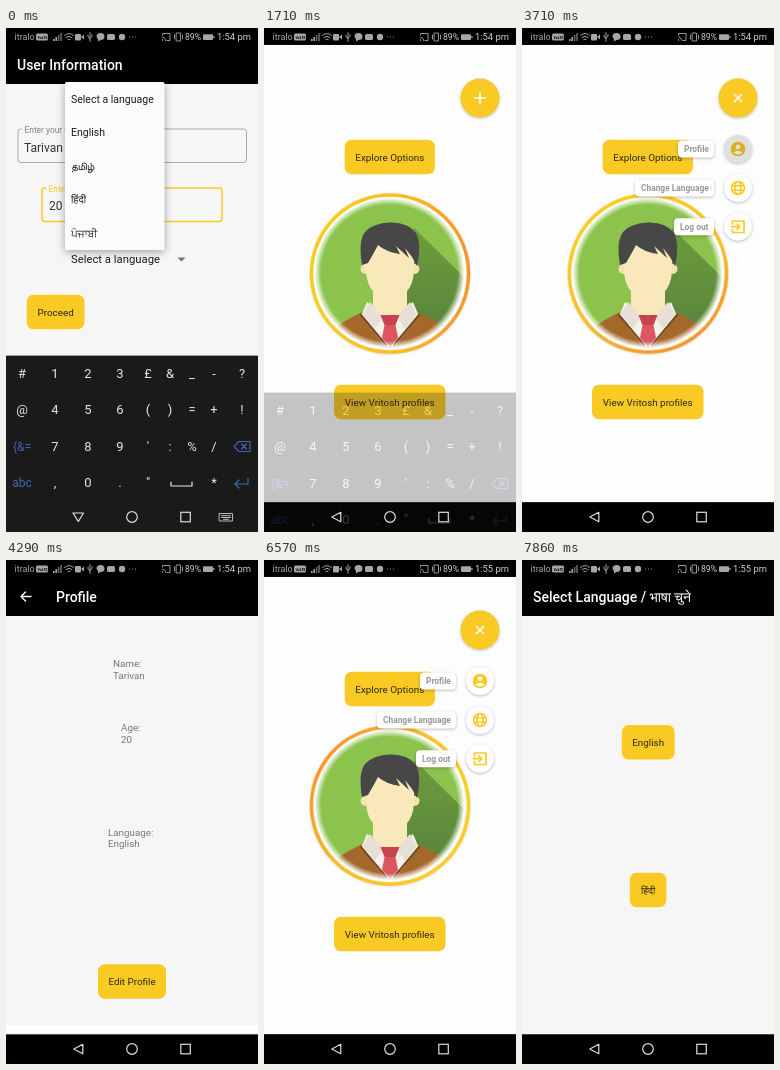
An HTML page for the animation above (8000 ms loop, 252 px wide and 504 px high).

```html
<!DOCTYPE html>
<html lang="en">
<head>
<meta charset="utf-8">
<title>App walkthrough</title>
<style>
html, body { margin: 0; width: 100%; height: 100%; overflow: hidden; background: #000; }
svg { display: block; width: 100vw; height: 100vh; font-family: Roboto, "Noto Sans", sans-serif; }
text { white-space: pre; }
.title { font-size: 14px; font-weight: 500; fill: #fff; }
.btn { font-size: 9.85px; fill: #2b2717; text-anchor: middle; }
.item { font-size: 10.5px; fill: #1c1c1c; }
.indic { font-weight: 500; }
.field { font-size: 12px; fill: #333; }
.hint { font-size: 8.4px; }
.info { font-size: 9.8px; fill: #777; }
.chip { font-size: 8.4px; font-weight: 700; fill: #989898; }
.status { font-size: 9px; fill: #a6a6a6; }
.bright { fill: #cfcfcf; }
.key { font-size: 13px; fill: #e6e6e6; text-anchor: middle; }
.fn { fill: #4166b0; }
.line { fill: none; stroke-linecap: round; stroke-linejoin: round; }
.lift { filter: drop-shadow(0 1px 1.5px rgba(0,0,0,.25)); }
.float { filter: drop-shadow(0 2px 4px rgba(0,0,0,.35)); }
#ring { transform-origin: 126px 245.5px; }
#plus { transform-origin: 216px 70px; }
</style>
</head>
<body>
<svg id="stage" viewBox="0 0 252 504" preserveAspectRatio="none"></svg>
<script>
const FRAMES = 56, LOOP = 8000;
const YELLOW = '#f9c924', DIM = '#a6a6a6';
const STATUS_BOTTOM = 16.8, NAV_TOP = 474.4;

const rect = (x, y, w, h, fill, rx = 0, more = '') =>
  `<rect x="${x}" y="${y}" width="${w}" height="${h}" rx="${rx}" fill="${fill}" ${more}/>`;
const circle = (x, y, r, fill, more = '') => `<circle cx="${x}" cy="${y}" r="${r}" fill="${fill}" ${more}/>`;
const path = (d, fill, more = '') => `<path d="${d}" fill="${fill}" ${more}/>`;
const line = (d, stroke, width = 1) => `<path class="line" d="${d}" stroke="${stroke}" stroke-width="${width}"/>`;
const text = (x, y, kind, label, more = '') => `<text x="${x}" y="${y}" class="${kind}" ${more}>${label}</text>`;
const group = (id, body, more = '') => `<g id="${id}" ${more}>${body}</g>`;
const button = (x, y, w, label) =>
  rect(x, y, w, 34.5, YELLOW, 7) + text(x + w / 2, y + 20.9, 'btn', label);
const page = (title, x) =>
  rect(0, 56, 252, NAV_TOP - 56, '#f6f6f6') + rect(0, 0, 252, 56, '#000') + text(x, 41.5, 'title', title);

const defs = `<defs>
  <linearGradient id="sweep" gradientUnits="userSpaceOnUse" x1="46" y1="0" x2="206" y2="0">
    <stop offset=".1" stop-color="#fbcb24"/><stop offset=".55" stop-color="#f9bd25"/><stop offset="1" stop-color="#f7952a"/>
  </linearGradient>
  <linearGradient id="shade" x1="0" y1="0" x2="0" y2="1">
    <stop offset="0" stop-color="#6d9c3d"/><stop offset="1" stop-color="#56803a"/>
  </linearGradient>
  <radialGradient id="soft" gradientUnits="userSpaceOnUse" cx="125.5" cy="245" r="75">
    <stop offset=".91" stop-color="#fff"/><stop offset="1" stop-color="#000"/>
  </radialGradient>
  <mask id="round">${circle(125.5, 245, 75, 'url(#soft)')}</mask>
</defs>`;

const form = () => page('User Information', 11) +
  rect(12, 101, 228.5, 33.5, 'none', 3, 'stroke="#a0a0a0" stroke-width=".9"') +
  rect(16, 98, 68, 6, '#f6f6f6') + text(18.5, 104.5, 'hint', 'Enter your name', 'fill="#808080"') +
  text(18, 123.5, 'field', 'Tarivan') +
  rect(36, 160, 180, 33.5, 'none', 3, `stroke="${YELLOW}" stroke-width="1.5"`) +
  rect(40, 157, 62, 6, '#f6f6f6') + text(42.5, 163.5, 'hint', 'Enter your age', `fill="${YELLOW}"`) +
  text(43, 182, 'field', '20') +
  group('unset', text(65, 235, 'item', 'Select a language', 'style="font-size:11.3px"')) +
  group('chosen', text(65, 235, 'item', 'English', 'style="font-size:11.3px"')) +
  path('M171.5 229.5h8l-4 4z', '#757575') +
  button(20.7, 266.8, 57.8, 'Proceed') +
  group('pressProceed', rect(20.7, 266.8, 57.8, 34.5, '#000', 7));

const dropdown = () => rect(59, 54, 99.5, 168, '#fbfbfb', 1.5, 'class="float"') +
  group('pressEnglish', rect(59, 88, 99.5, 33, '#000')) +
  ['Select a language', 'English', 'தமிழ்', 'हिंदी', 'ਪੰਜਾਬੀ']
    .map((label, i) => text(65, 75 + i * 33.4, i > 1 ? 'item indic' : 'item', label)).join('');

const avatar = () => `<g mask="url(#round)">` +
  rect(50, 168, 152, 154, '#8bc34d') +
  path('M150 200L202 251V322H140L112 290z', 'url(#shade)') +
  path('M62 322L72 300Q80 292 103 282L126 296 149 282Q172 292 180 300L190 322z', '#a5682b') +
  path('M103 274L126 292 149 274 155 288 131 318H121L97 288z', '#f5f1ea') +
  line('M97 287L122 317M155 287L130 317', '#75481f', 2) +
  circle(101.5, 241, 5, '#f7e2b0') + circle(150.5, 241, 5, '#f7e2b0') +
  path('M102 212H150V243Q149 257 143 263V279Q138 288 126 288T109 279V263Q103 257 102 243z', '#f9e8ba') +
  path('M98 237Q94 213 101 204 109 195 126 194.500 144 194 152 205 158 217 153 238L148 229 141 220 145 230 132 218 136 226Q122 224 114 217 111 223 104 235z', '#474747') +
  path('M106 274L119 289 111 301 99 286zM146 274L133 289 141 301 153 286z', '#e6dfd6') +
  path('M116.500 287H135.500L131.500 297H120.500z', '#c9434f') +
  path('M120.500 297H131.500L134 310 126 319 118 310z', '#dc5560') + '</g>';

const icons = [
  circle(216, 121, 7.3, YELLOW) + circle(216, 118.8, 2.4, '#fff') + path('M211.500 124.800Q216 120.500 220.500 124.800 216 128 211.500 124.800z', '#fff'),
  line('M209.500 160a6.500 6.500 0 1 0 13 0a6.500 6.500 0 1 0-13 0M213 160a3 6.500 0 1 0 6 0a3 6.500 0 1 0-6 0M210 157.700h12M210 162.300h12', YELLOW, 1.6),
  line('M210.500 196V193h11.500v11.500h-11.500v-3M209.500 198.700h8M215 196l2.700 2.700-2.700 2.700', YELLOW, 1.7)
];
const entries = [['Profile', 156, 121], ['Change Language', 113, 160], ['Log out', 152, 198.7]];

const menu = () => entries.map(([label, x, y], i) =>
  group('entry' + i,
    rect(x, y - 8.5, 192 - x, 17, '#fff', 4, 'class="lift"') + text(x + 6, y + 3, 'chip', label) +
    circle(216, y, 14, '#fff', 'class="lift"') + icons[i] +
    group('pressEntry' + i, circle(216, y, 14, '#000')),
    `style="transform-origin:216px ${y}px"`)).join('');

const home = () => rect(0, STATUS_BOTTOM, 252, NAV_TOP - STATUS_BOTTOM, '#fdfdfd') +
  `<g class="lift">${circle(126, 245.5, 79, '#fff')}</g>` +
  group('ring', circle(126, 245.5, 78.5, '#fff', 'stroke="url(#sweep)" stroke-width="3.6"')) +
  avatar() +
  button(80.7, 111.8, 90.3, 'Explore Options') + button(70, 356.7, 111.5, 'View Vritosh profiles') +
  menu() +
  circle(216, 70, 19.4, YELLOW, 'class="lift"') +
  group('pressFab', circle(212.5, 72, 13, '#a87800')) +
  group('plus', line('M211 70h10M216 65v10', '#fff', 1.7));

const profile = () => page('Profile', 50) + rect(0, 465, 252, NAV_TOP - 465, '#fff') +
  group('pressBack', circle(20, 36.5, 14, '#fff')) +
  line('M25 36.5H15M19.5 32L15 36.5l4.5 4.5', '#fff', 1.4) +
  [['Name:', 'Tarivan', 107, 107], ['Age:', '20', 115, 171], ['Language:', 'English', 102, 275.5]]
    .map(([label, value, x, y]) => text(x, y, 'info', label) + text(x, y + 11.6, 'info', value)).join('') +
  button(92, 404.3, 68, 'Edit Profile');

const languages = () => page('Select Language / भाषा चुने', 11) +
  button(99.8, 165, 52.8, 'English') + button(107.8, 312.8, 36.6, 'हिंदी');

const keyColumns = [16, 49, 82, 114, 142, 164, 186, 208, 236];
const keyRows = ['# 1 2 3 £ &amp; _ - ?', '@ 4 5 6 ( ) = + !', "{&amp;= 7 8 9 ' : % /", 'abc , 0 . "  _ *'];
const keyboard = () => rect(0, 327.6, 252, 176.4, '#1a1a1a') +
  keyRows.map((row, r) => row.split(' ').map((key, c) => {
    if (r === 3 && key === '_') return '';
    const wide = r > 1 && c === 0;
    return text(keyColumns[c], 349.5 + r * 36.5, wide ? 'key fn' : 'key', key, wide ? 'style="font-size:12px"' : '');
  }).join('')).join('') +
  line('M165 454v4h21v-4', '#e6e6e6', 1.2) +
  line('M228 418.500l5-5h11v10h-11zM235.500 416l5 5M240.500 416l-5 5', '#4166b0', 1.2) +
  line('M242 450v6h-13M233 452l-4 4 4 4', '#4166b0', 1.2);

const clock = (id, time) => group(id, text(211, 12, 'status bright', time, 'style="font-size:9.4px"'));
const statusBar = () => rect(0, 0, 252, STATUS_BOTTOM, '#000') +
  text(8.5, 12, 'status', 'itralo') +
  rect(30, 5.5, 12, 7, DIM, 1.5) + text(31.5, 11, '', 'VoLTE', 'font-size="3.6" font-weight="700"') +
  [0, 1, 2, 3].map(i => rect(47 + i * 2.4, 11 - i * 2, 1.6, 2 + i * 2, i < 2 ? DIM : '#666')).join('') +
  line('M58.500 7.500q4.500-4 9 0M60 9.500q3-2.600 6 0M61.800 11.500q1.200-1 2.400 0', DIM) +
  rect(69, 6, 6, 6.5, DIM, 1) + path('M75 9l3-2.500v5z', DIM) +
  line('M84 4.500v9M82 7v2l2 1.500M86 6.500v2l-2 1.500', DIM, .9) +
  path('M90.500 8.500a4 3.500 0 1 1 4 3.500l-2.500 1.500v-2z', DIM) +
  rect(101, 6, 8, 6, DIM, 1.5) + circle(116, 9, 3.2, DIM) +
  [123.5, 126.5, 129.5].map(x => circle(x, 9, .6, DIM)).join('') +
  line('M156.500 7V5.500h7.500v7h-3M156.500 9q3 .3 3.300 3.500M156.500 11.500v1', DIM, .9) +
  line('M170.500 5h4v8h-4zM168.500 7v4M176.500 7v4', DIM, .9) +
  text(179, 12, 'status bright', '89%', 'style="font-size:8.6px"') +
  rect(197, 6.2, 10, 5.8, DIM, 1) + rect(207.3, 8, 1.2, 2.2, DIM) +
  clock('clockA', '1:54 pm') + clock('clockB', '1:55 pm');

const navIcons = () =>
  group('navBack', line('M76.800 484.300v9.400l-9-4.700z', '#ddd', 1.2)) +
  group('navHide', line('M67 485h10.500l-5.200 8.500z', '#ddd', 1.2) +
    line('M213.500 485.500h13v7.500h-13zM215.500 487.700h9M215.500 489.500h9M217.500 491.300h5', '#ccc', .9)) +
  circle(126, 489, 5.3, 'none', 'stroke="#ddd" stroke-width="1.2"') +
  rect(174.8, 484.3, 9.5, 9.5, 'none', 0, 'stroke="#ddd" stroke-width="1.2"');

document.getElementById('stage').innerHTML = defs + home() + group('form', form()) +
  group('dropdown', dropdown()) + group('profile', profile()) + group('languages', languages()) +
  rect(0, NAV_TOP, 252, 30, '#000') + group('keyboard', keyboard()) + statusBar() + navIcons();

// Each step is [tick, value]; a value holds until the next step.
function track(id, property, ...steps) {
  const frames = steps.map(([tick, value]) => ({ offset: tick / FRAMES, [property]: value, easing: 'step-end' }));
  frames.push({ offset: 1, [property]: steps[steps.length - 1][1] });
  document.getElementById(id).animate(frames, { duration: LOOP, delay: -6, iterations: Infinity });
}
const fade = (id, ...steps) => track(id, 'opacity', ...steps);

fade('pressEnglish', [0, 0], [3, .12]);
fade('dropdown', [0, 1], [4, .5], [5, 0]);
fade('unset', [0, 1], [4, 0]);
fade('chosen', [0, 0], [4, 1]);
fade('pressProceed', [0, 0], [9, .08], [10, .16]);
fade('form', [0, 1], [11, .4], [12, 0]);

fade('keyboard', [0, 1], [12, .25], [13, 0]);
track('keyboard', 'transform', [0, 'translateY(0)'], [12, 'translateY(37px)']);
fade('navHide', [0, 1], [12, 0]);
fade('navBack', [0, 0], [12, 1]);

fade('pressFab', [0, 0], [19, .06], [20, .12], [21, .06], [22, 0], [44, .12], [45, .06], [46, 0]);
track('plus', 'transform', [0, 'rotate(0deg)'], [21, 'rotate(25deg)'], [22, 'rotate(45deg)'], [28, 'rotate(0deg)'],
  [45, 'rotate(25deg)'], [46, 'rotate(45deg)']);
entries.forEach((_, i) => {
  fade('entry' + i, [0, 0], [21, .6], [22, 1], [28, 0], [45, .6], [46, 1]);
  track('entry' + i, 'transform', [0, 'scale(.6)'], [22, 'scale(1)'], [28, 'scale(.6)'], [46, 'scale(1)']);
});
fade('pressEntry0', [0, 0], [25, .08], [26, .12], [28, 0]);
fade('pressEntry1', [0, 0], [50, .08], [51, .12]);
fade('pressEntry2', [0, 0]);

fade('profile', [0, 0], [27, .5], [28, .9], [29, 1], [37, .5], [38, 0]);
track('profile', 'transform', [0, 'translateY(0)'], [27, 'translateY(16px)'], [28, 'translateY(4px)'], [29, 'translateY(0)']);
fade('pressBack', [0, 0], [36, .25], [38, 0]);

fade('languages', [0, 0], [52, .5], [53, .9], [54, 1]);
track('languages', 'transform', [0, 'translateY(0)'], [52, 'translateY(16px)'], [53, 'translateY(4px)'], [54, 'translateY(0)']);

fade('clockA', [0, 1], [44, 0]);
fade('clockB', [0, 0], [44, 1]);

// The ring turns 30 degrees per tick, restarting when the home screen comes back.
track('ring', 'transform', ...Array.from({ length: FRAMES }, (_, n) =>
  [n, `rotate(${(n - (n < 30 ? 12 : 39)) * 30}deg)`]));
</script>
</body>
</html>
```
